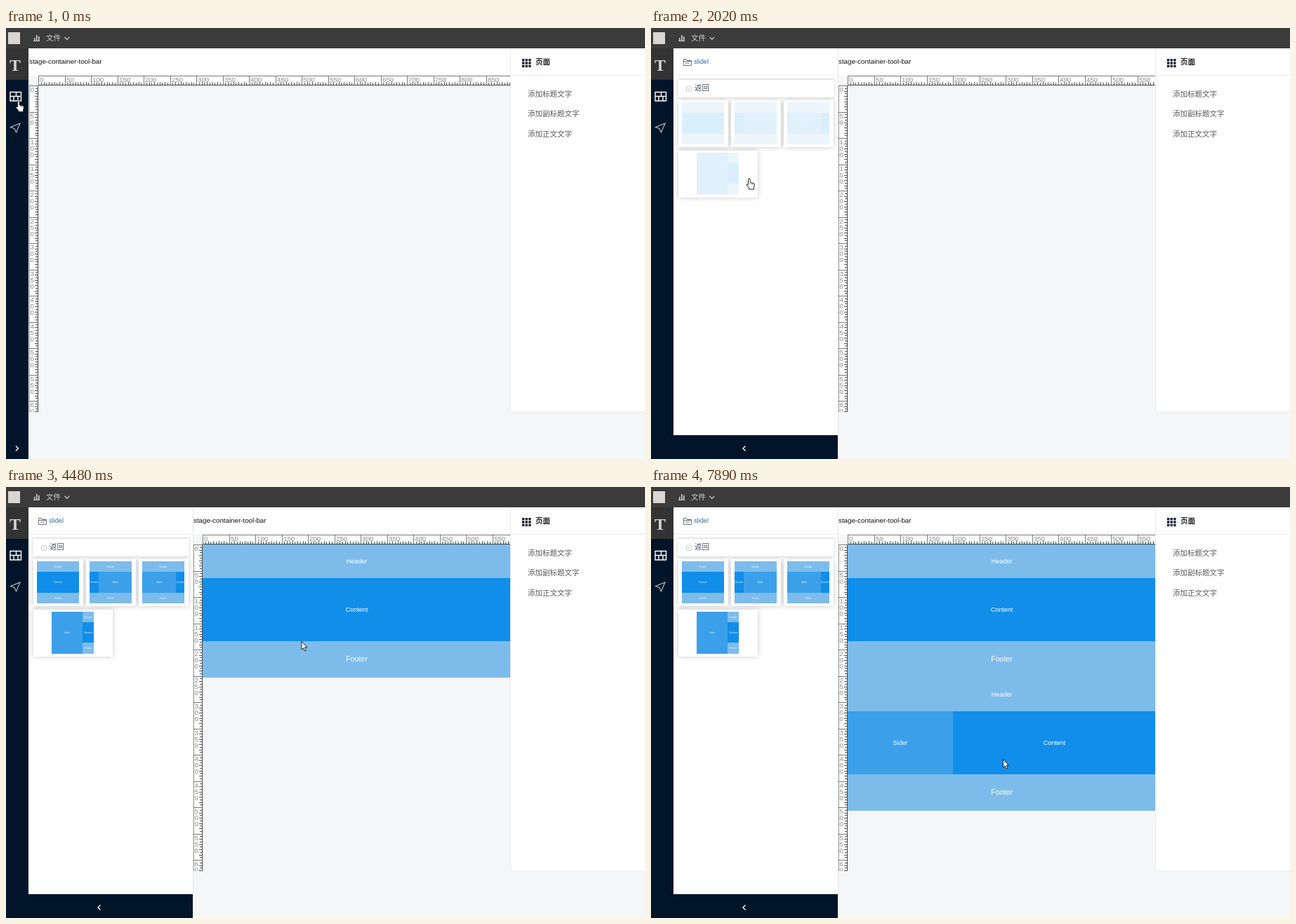
Animation of 910 by 615 pixels, one loop 7.99 s. Source, as an HTML page with a canvas:

```html
<!DOCTYPE html>
<html lang="zh">
<head>
<meta charset="utf-8">
<style>
html, body { margin: 0; width: 100%; height: 100%; overflow: hidden; }
canvas { display: block; }
</style>
</head>
<body>
<canvas id="stage" width="910" height="615"></canvas>
<script>
const ctx = document.getElementById('stage').getContext('2d');
const LOOP = 7990;
const FONT = '"Liberation Sans", "Noto Sans CJK SC", "Noto Sans CJK", sans-serif';
const NAVY = '#001529', INK = '#3d4454', PAGE = '#f5f6f8';
const EDGE = '#7dbcea', SIDER = '#3ba0e9', MAIN = '#108ee9';

// Pointer path: time, x, y
const PATH = [
  [0, 18, 104], [70, 18, 104], [80, 16, 106], [360, 16, 106], [600, 22, 112], [1140, 62, 190],
  [1240, 70, 198], [1390, 99, 216], [1600, 140, 214], [2300, 140, 215], [2600, 95, 117],
  [2840, 88, 130], [2900, 85, 130], [3090, 263, 192], [3160, 330, 188], [3320, 430, 183],
  [3460, 435, 183], [4170, 435, 183], [4310, 443, 232], [4410, 443, 232], [4480, 421, 220],
  [4960, 140, 130], [5180, 140, 130], [5590, 408, 317], [5900, 441, 346], [6130, 441, 346],
  [6340, 444, 348], [6570, 444, 348], [6720, 610, 358], [6950, 610, 358], [7190, 610, 280],
  [7350, 610, 280], [7550, 606, 237], [7890, 501, 388], [LOOP, 501, 388]
];

const within = (t, a, b) => t >= a && t < b;
const clamp = v => Math.max(0, Math.min(1, v));

function pointerAt(t) {
  const i = PATH.findIndex(k => k[0] > t);
  const [t0, x0, y0] = PATH[i - 1], [t1, x1, y1] = PATH[i];
  const p = (t - t0) / (t1 - t0);
  return [x0 + (x1 - x0) * p, y0 + (y1 - y0) * p];
}

function rect(x, y, w, h, color) {
  ctx.fillStyle = color;
  ctx.fillRect(x, y, w, h);
}

function frame(x, y, w, h, color, radius = 0, fill) {
  ctx.beginPath();
  ctx.roundRect(x + .5, y + .5, w - 1, h - 1, radius);
  if (fill) { ctx.fillStyle = fill; ctx.fill(); }
  ctx.strokeStyle = color;
  ctx.lineWidth = 1;
  ctx.stroke();
}

function text(str, x, y, size, color, align = 'left', weight = '') {
  ctx.font = `${weight} ${size}px ${FONT}`;
  ctx.textAlign = align;
  ctx.textBaseline = 'middle';
  ctx.fillStyle = color;
  ctx.fillText(str, x, y);
}

function line(d, color, width = 1, fill) {
  const path = new Path2D(d);
  if (fill) { ctx.fillStyle = fill; ctx.fill(path); }
  ctx.strokeStyle = color;
  ctx.lineWidth = width;
  ctx.stroke(path);
}

function at(x, y, draw) {
  ctx.save();
  ctx.translate(x, y);
  draw();
  ctx.restore();
}

function clipped(x, y, w, h, draw) {
  ctx.save();
  ctx.beginPath();
  ctx.rect(x, y, w, h);
  ctx.clip();
  draw();
  ctx.restore();
}

function block(x, y, w, h, color, label, size) {
  rect(x, y, w, h, color);
  text(label, x + w / 2, y + h / 2 + .5, size, '#fff', 'center');
}

// Top bar, tool strip and page list
function drawTopBar() {
  rect(0, 0, 910, 29, '#3b3b3b');
  rect(3, 6, 17, 17, '#d9d6d3');
  [[40, 4], [43, 8], [46, 6]].forEach(([x, h]) => rect(x, 18 - h, 1.6, h, '#d0d0d0'));
  rect(39, 18, 9, 1, '#d0d0d0');
  text('文件', 57, 15, 10.5, '#d0d0d0');
  line('M83.5 13l3.3 3.3 3.3-3.3', '#d0d0d0', 1.2);
}

function drawToolStrip(width) {
  rect(0, 29, 32, 586, NAVY);
  rect(0, 29, 32, 45, '#333');
  ctx.font = 'bold 24px "Liberation Serif", serif';
  ctx.textAlign = 'left';
  ctx.textBaseline = 'alphabetic';
  ctx.fillStyle = '#d4d4d4';
  ctx.fillText('T', 5, 61);
  line('M6 91.5H21.5V104H6zM6 97.5H21.5M14.5 91.5V97.5M11 97.5V104M17 97.5V104', '#fff', 1.4);
  line('M6.5 141.5L20 136 14.5 149 12 143.5z', '#bfc5cb', 1.1);
  rect(0, 581, width, 34, NAVY);
  at(width / 2, 600, () => line(width > 150 ? 'M1.5-3.5L-2 0 1.5 3.5' : 'M-2-3.5L1.5 0-2 3.5', '#fff', 1.4));
}

function drawPageList() {
  rect(719, 29, 191, 518, '#fff');
  rect(718, 29, 1, 518, '#e9eaec');
  rect(719, 67, 191, 1, '#ededed');
  rect(719, 547, 191, 1, '#eeeff1');
  for (let i = 0; i < 9; i++) rect(735 + i % 3 * 4.6, 44 + (i / 3 | 0) * 4.4, 3.3, 3.3, NAVY);
  text('页面', 754, 49.5, 10.5, '#222', 'left', 'bold');
  ['添加标题文字', '添加副标题文字', '添加正文文字']
    .forEach((label, i) => text(label, 743, 95 + i * 28.5, 10.5, '#595959'));
}

// Rulers: 50 units are 37.5 px
function drawRulers(left) {
  const x0 = left + 14, y0 = 82, step = 3.75;
  rect(left, 29, 719 - left, 39, '#fff');
  text('stage-container-tool-bar', left + 1, 48, 9.75, '#111');
  clipped(x0, 68, 719 - x0, 14, () => {
    rect(x0, 68, 719, 14, '#fff');
    rect(x0, 68, 719, 1, '#777');
    rect(x0, 81, 719, 1, '#444');
    for (let i = 0; i < 190; i++) {
      const x = Math.round(x0 + i * step), h = i % 10 ? (i % 2 ? 3 : 4) : 13;
      rect(x, 81 - h, 1, h, i % 10 ? '#555' : '#777');
      if (i % 10 === 0) text(i * 5, x + 2, 74, 9.75, '#8a8a8a');
    }
  });
  clipped(left + 1, y0, 13, 466, () => {
    rect(left, y0, 14, 466, '#fff');
    rect(left + 1, y0, 1, 466, '#999');
    rect(left + 13, y0, 1, 466, '#444');
    for (let i = 0; i < 130; i++) {
      const y = Math.round(y0 + i * step), w = i % 10 ? (i % 2 ? 3 : 4) : 12;
      rect(left + 13 - w, y, w, 1, i % 10 ? '#555' : '#777');
      if (i % 10 === 0) [...String(i * 5)].forEach((digit, n) => text(digit, left + 2.5, y + 6 + n * 9, 9.75, '#8a8a8a'));
    }
  });
}

// Component panel
const TILES = [
  [48, 177, 57, '栅格', 'M72.5 186V211M82.5 186V211M65 193.5H89M65 204.5H89'],
  [121, 177, 57, '布局', 'M137.5 191.5H156.5V210.5H137.5zM142.5 191V186.5H161.5V204.5H157'],
  [193, 177, 57, '卡片', 'M210 189.5H233Q235.5 189.5 235.5 192V205Q235.5 207.5 233 207.5H210Q208.5 207.5 208.5 205V192Q208.5 189.5 210 189.5M208 194.5H235M208 198.5H235M212 203.5H216M218 203.5H228'],
  [48, 252, 60, '折叠面板', 'M67 261.5H89M65 264.5H91M64.5 267.5H92.5V286.5H64.5z'],
  [121, 252, 60, '面板分割', 'M138.5 261.5H162.5V286.5H138.5z'],
  [193, 252, 57, '分割线', 'M213 273.5H230'],
  [48, 327, 57, '单元格', 'M64.5 336.5H88.5V361.5H64.5zM72 342.5H85M72 348.5H85M72 354.5H85M68 342.5H70M68 348.5H70M68 354.5H70']
];

function drawTiles(hovered) {
  text('添加标题文字', 149, 87, 18, '#3f4856', 'center');
  text('添加副标题文字', 149, 115, 13.5, '#4a5361', 'center');
  text('添加正文文字', 149, 143.5, 10.5, '#4f5763', 'center');
  rect(32, 161, 234, 1, '#ececec');
  TILES.forEach(([x, y, w, label, icon], i) => {
    const active = hovered && i === 1;
    frame(x, y, w, 60, active ? '#8fc1ea' : '#e2e3e6', 3, '#fff');
    line(icon, active ? '#5580b8' : INK, 1.1);
    text(label, x + w / 2, y + 48, 9, '#4b505a', 'center');
  });
}

// Thumbnails: upper bar, lower bar and columns, all in a 60 px square
function drawThumb(kind) {
  const size = 3.3;
  if (kind === 3) {
    block(0, 0, 44, 60, SIDER, 'Sider', size);
    block(44, 0, 16, 15, EDGE, 'Header', size);
    block(44, 15, 16, 29, MAIN, 'Content', size);
    block(44, 44, 16, 16, EDGE, 'Footer', size);
    return;
  }
  block(0, 0, 60, 15, EDGE, 'Header', size);
  block(0, 45, 60, 15, EDGE, 'Footer', size);
  if (kind === 0) block(0, 15, 60, 30, MAIN, 'Content', size);
  if (kind === 1) {
    block(0, 15, 13, 30, MAIN, 'Content', size);
    block(13, 15, 47, 30, SIDER, 'Sider', size);
  }
  if (kind === 2) {
    block(0, 15, 48, 30, SIDER, 'Sider', size);
    block(48, 15, 12, 30, MAIN, 'Content', size);
  }
}

function shadowed(blur, draw) {
  ctx.save();
  ctx.shadowColor = 'rgba(0,0,0,.22)';
  ctx.shadowBlur = blur;
  draw();
  ctx.restore();
}

function drawLayouts(thumbAlpha) {
  shadowed(3, () => rect(38, 73, 223, 26, '#fff'));
  frame(37, 73, 225, 27, '#e6e7ea', 2, '#fff');
  ctx.beginPath();
  ctx.arc(54, 87, 4, 0, 7);
  ctx.strokeStyle = '#b5bcc4';
  ctx.lineWidth = .8;
  ctx.stroke();
  line('M55 85L53 87 55 89', '#b5bcc4', .8);
  text('返回', 62, 86.5, 10.5, '#46505f');
  [[39, 103, 71], [114, 103, 71], [189, 103, 71], [39, 175, 113]].forEach(([x, y, w], kind) => {
    shadowed(7, () => rect(x, y, w, 67, '#fff'));
    ctx.save();
    ctx.globalAlpha = thumbAlpha;
    ctx.translate(kind === 3 ? 65 : x + 5, y + 3);
    drawThumb(kind);
    ctx.restore();
  });
}

function drawPanel(width, t) {
  const listed = t >= 1980;
  clipped(32, 29, width - 32, 552, () => {
    rect(32, 29, 234, 552, '#fff');
    line('M46.5 44.5H50.5L51.5 46.5H57.5V53.5H46.5zM46.5 47.5H57M49 50H55', '#5c6470', .9);
    text('slidel', 61, 48.5, 9.2, listed ? '#2b6a9c' : '#7b838d');
    rect(32, 67, 234, 1, '#ededed');
    if (listed) drawLayouts(t < 2070 ? .15 : t < 2160 ? .7 : 1);
    else drawTiles(t >= 1300);
  });
  if (width > 33) rect(width, 29, 1, 552, '#e6e7ea');
}

// Placed layouts and drop previews
function drawFirstLayout(w, placed) {
  const small = placed ? 9 : 10.5;
  block(280, 82, w, 48, EDGE, 'Header', small);
  block(280, 130, w, 90, MAIN, 'Content', small);
  rect(280, 220, w, placed ? 52 : 49.5, EDGE);
  text('Footer', 280 + w / 2, 246, 10.5, '#fff', 'center');
}

function drawSecondLayout(w, placed) {
  const small = placed ? 9 : 10.5;
  block(280, 272, w, 48, EDGE, 'Header', small);
  if (placed) {
    block(280, 320, 150, 90, SIDER, 'Sider', small);
    block(430, 320, w - 150, 90, MAIN, 'Content', small);
  } else {
    block(280, 320, 41, 90, MAIN, 'Content', small);
    block(321, 320, w - 41, 90, SIDER, 'Sider', small);
  }
  rect(280, 410, w, placed ? 52 : 49.5, EDGE);
  text('Footer', 280 + w / 2, 436, 10.5, '#fff', 'center');
}

function drawGhost(x, y, kind) {
  ctx.save();
  ctx.globalAlpha = .75;
  ctx.translate(Math.round(x), Math.round(y));
  const hole = new Path2D('M0 0H70V67H0zM5 3V63H65V3z');
  ctx.fillStyle = '#fff';
  ctx.fill(hole, 'evenodd');
  ctx.translate(5, 3);
  drawThumb(kind);
  ctx.restore();
}

function drawPointer(x, y, hand, pressed, dragging) {
  if (pressed) {
    ctx.beginPath();
    ctx.arc(x, y, 9.7, 0, 7);
    ctx.fillStyle = 'rgba(158,210,88,.85)';
    ctx.fill();
  }
  at(x, y, () => {
    if (hand) {
      line('M-1.5 .8Q0-.6 1.2.8V6L6 7Q7.6 7.4 7.4 9.5L6.6 13V15.5H-.5V13.5L-4 9.5Q-4.4 7.6-1.5 8.8z', '#222', 1, '#fff');
      line('M3.2 7V9M5.2 7.5V9.5', '#555', .7);
    } else {
      line('M.5.5V12.2L3 9.8 5 14.3 7 13.4 5 9H8.3z', '#222', 1, '#fff');
    }
    if (dragging) line('M3 12.5H10.5V18H3z', '#b0642d', 1);
  });
}

function draw(t) {
  const open = clamp((t - 360) / 300);
  const width = 32 + 234 * (1 - (1 - open) ** 3);
  const [x, y] = pointerAt(t);
  const firstDrag = within(t, 2900, 3640), secondDrag = within(t, 5180, 6130);
  const dragging = firstDrag || secondDrag;

  rect(0, 0, 910, 615, PAGE);
  drawRulers(width);
  if (t >= 3160) drawFirstLayout(t < 3710 ? 188 : 439, t >= 3710);
  if (t >= 5350) drawSecondLayout(t < 6200 ? 188 : 439, t >= 6200);
  drawPageList();
  drawPanel(width, t);
  drawToolStrip(width);
  drawTopBar();

  if (firstDrag) drawGhost(x - 46, y - 28, 0);
  if (secondDrag) drawGhost(x - 26, y - 27, 1);
  const hand = x < 262 && !dragging && !within(t, 620, 1200);
  drawPointer(x, y, hand, dragging || within(t, 70, 120) || within(t, 1850, 1920), dragging);
}

const start = performance.now();
function tick() {
  draw((performance.now() - start) % LOOP);
  requestAnimationFrame(tick);
}
tick();
</script>
</body>
</html>
```
